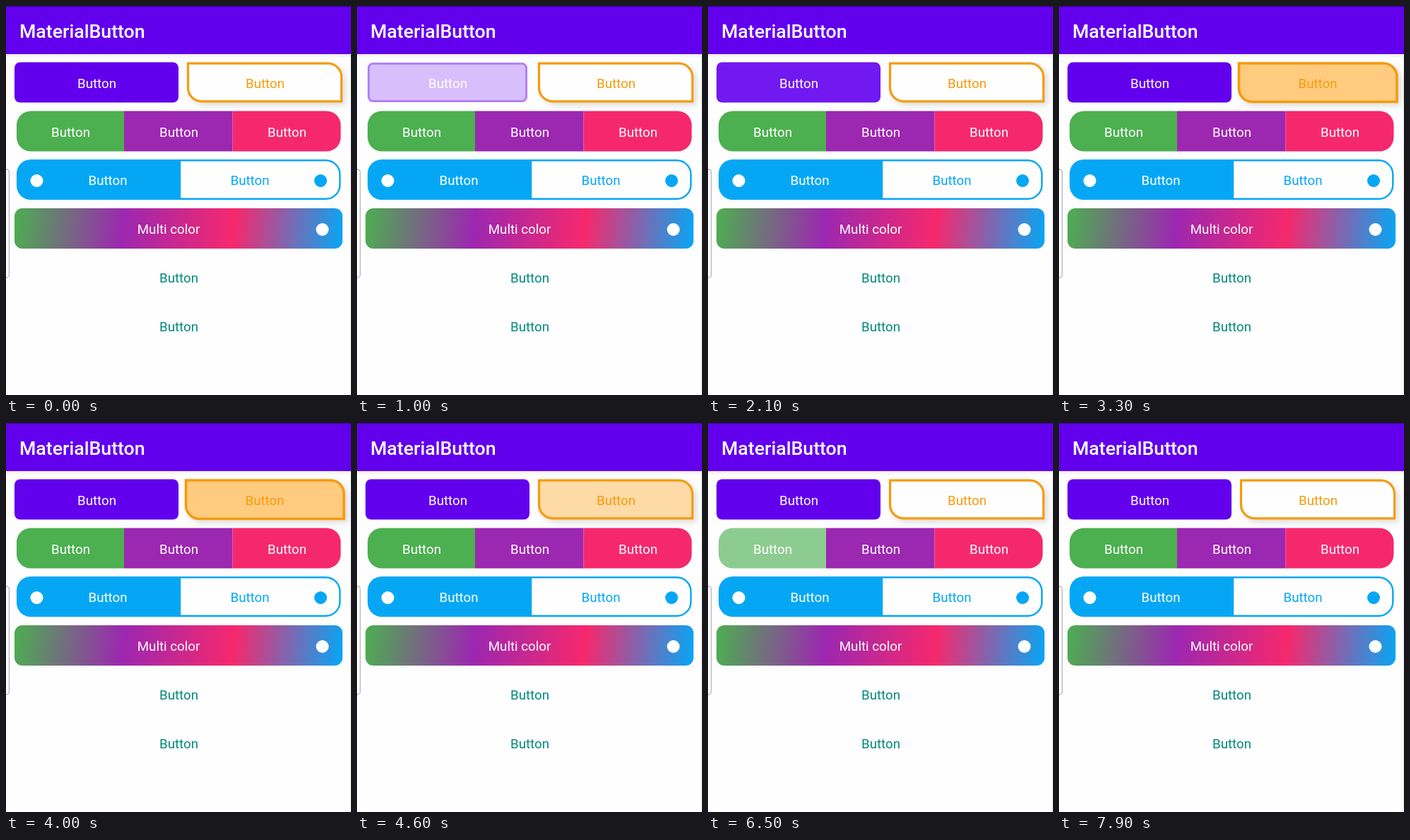
An HTML page for the animation above (8000 ms loop, 488x550 px).

```html
<!DOCTYPE html>
<html lang="en">
<head>
<meta charset="utf-8">
<title>MaterialButton</title>
<style>
  html, body { margin: 0; width: 100%; height: 100%; overflow: hidden; background: #fefefe; }
  svg { display: block; }
  text { font: 18.7px Roboto, sans-serif; text-anchor: middle; fill: #fff; }
  .title { font-size: 26.7px; font-weight: 500; text-anchor: start; }
  .teal { fill: #00897b; }
  .blue { fill: #05a7f5; }
  .orange { fill: #f59b0c; }
  #outlined { stroke: #f59b0c; filter: drop-shadow(4px 4px 4px #0002); }
</style>
</head>
<body>
<svg width="488" height="550" viewBox="0 0 488 550">
  <defs>
    <linearGradient id="multi" gradientUnits="userSpaceOnUse" x1="12" y1="286" x2="476" y2="343">
      <stop offset="0" stop-color="#4caf50"/>
      <stop offset=".333" stop-color="#9c27b0"/>
      <stop offset=".667" stop-color="#f6286d"/>
      <stop offset="1" stop-color="#05a7f5"/>
    </linearGradient>
    <linearGradient id="shade" x2="0" y2="1">
      <stop stop-color="#000" stop-opacity=".07"/>
      <stop offset="1" stop-color="#000" stop-opacity="0"/>
    </linearGradient>
  </defs>

  <rect y="68" width="488" height="6" fill="url(#shade)"/>
  <rect width="488" height="68" fill="#6200ee"/>
  <rect width="488" height="1.5" fill="#4600b8"/>
  <text class="title" x="19" y="45">MaterialButton</text>
  <path d="M487.5 68V550" stroke="#dedede"/>
  <rect x="-10" y="231" width="14.5" height="153" rx="4" fill="#fefefe" stroke="#b4b4b8" stroke-width="1.3"/>

  <rect id="filled"/>
  <text x="128.5" y="115.7">Button</text>

  <path id="outlined"/>
  <text class="orange" id="outlinedText" y="115.7">Button</text>

  <path id="green" d="M167 148.500H35a20 20 0 0 0-20 20v17a20 20 0 0 0 20 20H167z"/>
  <path d="M167 148.500H320.500v57H167z" fill="#9c27b0"/>
  <path d="M320.500 148.500H453.500a20 20 0 0 1 20 20v17a20 20 0 0 1-20 20H320.500z" fill="#f6286d"/>
  <text x="91.500" y="184.500">Button</text>
  <text x="244.500" y="184.500">Button</text>
  <text x="397.500" y="184.500">Button</text>

  <path class="blue" d="M246.500 217H35a20 20 0 0 0-20 20v17a20 20 0 0 0 20 20H246.500z"/>
  <path d="M246 218.200H452.300a20 20 0 0 1 20 20v14.600a20 20 0 0 1-20 20H246z" fill="#fefefe" stroke="#05a7f5" stroke-width="2.4"/>
  <circle cx="43.500" cy="247" r="9" fill="#fff"/>
  <circle class="blue" cx="445" cy="247" r="9"/>
  <text x="144" y="253.200">Button</text>
  <text class="blue" x="345" y="253.200">Button</text>

  <rect x="12" y="286" width="464" height="57" rx="11" fill="url(#multi)"/>
  <circle cx="447.500" cy="316" r="9" fill="#fff"/>
  <text x="230" y="322">Multi color</text>
  <text class="teal" x="244.500" y="390.700">Button</text>
  <text class="teal" x="244.500" y="459.500">Button</text>
</svg>
<script>
const LOOP = 8000, FADE_IN = 150, FADE_OUT = 300;
const $ = id => document.getElementById(id);
const set = (id, attrs) => {
  for (const key in attrs) $(id).setAttribute(key, attrs[key]);
};
const clamp = v => Math.max(0, Math.min(1, v));

// Size snaps on touch and release; the tint fades.
function press(t, down, up) {
  return {
    held: t >= down && t < up,
    tint: clamp((t - down) / FADE_IN) * (1 - clamp((t - up) / FADE_OUT))
  };
}

const mix = (from, to, k) =>
  `rgb(${from.map((v, i) => Math.round(v + (to[i] - v) * k))})`;

function cutPath(x, y, w, h, r) {
  return `M${x} ${y}h${w - r}a${r} ${r} 0 0 1 ${r} ${r}v${h - r}` +
    `h${r - w}a${r} ${r} 0 0 1 ${-r} ${-r}z`;
}

function draw(t) {
  const a = press(t, 500, 1840);
  const b = press(t, 2850, 4510);
  const c = press(t, 5450, 6420);
  const white = [255, 255, 255];

  set("filled", {
    ...(a.held
      ? { x: 16.5, y: 81.5, width: 223, height: 53, rx: 6 }
      : { x: 12, y: 79.5, width: 232, height: 57, rx: 8 }),
    fill: mix([98, 0, 238], white, a.tint * .75),
    stroke: a.held ? mix([98, 0, 238], white, a.tint * .5) : "none",
    "stroke-width": 3
  });

  set("outlined", {
    d: b.held ? cutPath(254.5, 81, 223.5, 54.5, 19) : cutPath(257.5, 81.2, 217, 53.6, 19),
    fill: mix([254, 254, 254], [255, 152, 0], b.tint * .5),
    "stroke-width": b.held ? 3.6 : 3.2
  });
  set("outlinedText", { x: b.held ? 366 : 366.5 });

  set("green", { fill: mix([76, 175, 80], white, c.tint * .5) });
}

function tick() {
  draw(performance.now() % LOOP);
  requestAnimationFrame(tick);
}
tick();
</script>
</body>
</html>
```
